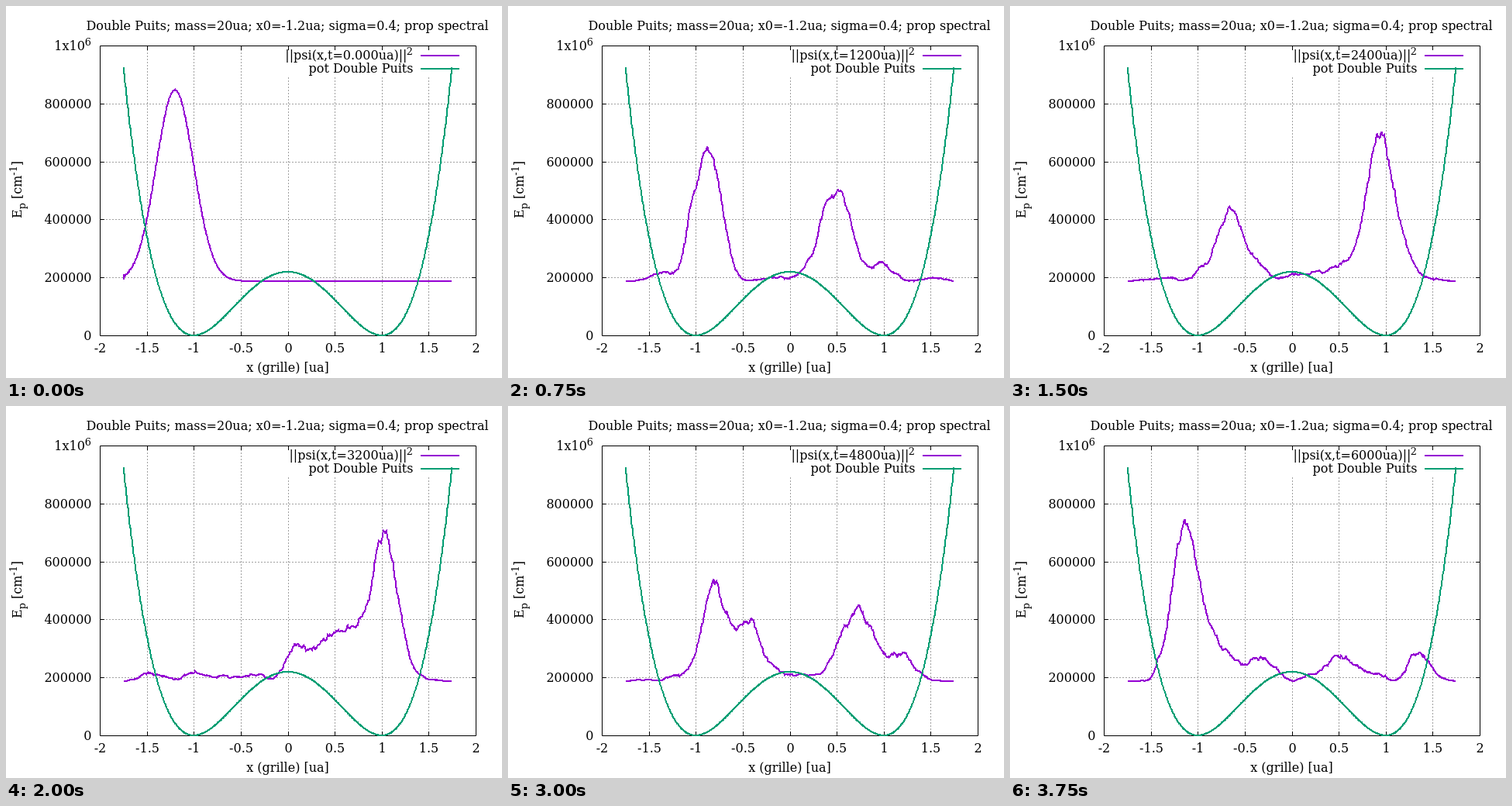
An HTML page that plays this animation: 640x480 px, repeating every 4000 ms.

```html
<!DOCTYPE html>
<html>
<head>
<meta charset="utf-8">
<style>
html, body { margin: 0; width: 100%; height: 100%; overflow: hidden; background: #fff; }
svg { display: block; width: 640px; height: 480px; font: 16px "DejaVu Serif", serif; }
.small { font-size: 12.8px; }
.grid { stroke: #a0a0a0; stroke-dasharray: 2 2; }
.curve { fill: none; stroke-width: 2; shape-rendering: crispEdges; }
.axis { fill: none; stroke: #000; }
</style>
</head>
<body>
<svg id="stage" viewBox="0 0 640 480"></svg>
<script>
// Plot coordinates, in whole pixels
const px = x => Math.round(363.5 + 121.25 * x);
const py = value => Math.round(425 - 374 * value / 1e6);
const PURPLE = '#9400d3', GREEN = '#009e73';

// Wave packet in the double well (x² - 1)², inside a box with hard walls
const HALF = 1.75, LENGTH = 2 * HALF, MASS = 20, START = -1.2, SIGMA = 0.4;
const POINTS = 700, MODES = 350, STEP = LENGTH / POINTS;
const WELL_SCALE = 219474.6, WAVE_BASE = 187200, WAVE_SCALE = 658600;
const xs = Array.from({ length: POINTS }, (_, i) => -HALF + (i + 0.5) * STEP);
const well = x => (x * x - 1) ** 2;
const packet = x => Math.exp(-(((x - START) / SIGMA) ** 2));
const mode = (j, i) => Math.sin(j * Math.PI * (i + 0.5) / POINTS);

// Jacobi diagonalisation: h becomes diagonal, rows of the result are eigenvectors
function diagonalise(h) {
  const n = h.length;
  const vectors = h.map((_, i) => Float64Array.from({ length: n }, (_, j) => +(i === j)));
  for (let sweep = 0, rotated = true; rotated && sweep < 15; sweep++) {
    rotated = false;
    for (let p = 0; p < n; p++) for (let q = p + 1; q < n; q++) {
      const off = h[p][q];
      if (Math.abs(off) < 1e-9) continue;
      rotated = true;
      const theta = (h[q][q] - h[p][p]) / (2 * off);
      const t = (theta < 0 ? -1 : 1) / (Math.abs(theta) + Math.hypot(theta, 1));
      const c = 1 / Math.hypot(t, 1), s = t * c;
      const hp = h[p], hq = h[q], vp = vectors[p], vq = vectors[q];
      const pp = hp[p] - t * off, qq = hq[q] + t * off;
      for (let k = 0; k < n; k++) {
        const a = hp[k], b = hq[k], u = vp[k], w = vq[k];
        hp[k] = c * a - s * b;
        hq[k] = s * a + c * b;
        vp[k] = c * u - s * w;
        vq[k] = s * u + c * w;
      }
      for (let k = 0; k < n; k++) { h[k][p] = hp[k]; h[k][q] = hq[k]; }
      hp[p] = pp; hq[q] = qq; hp[q] = hq[p] = 0;
    }
  }
  return vectors;
}

const cosines = Array.from({ length: 2 * MODES + 1 }, (_, n) =>
  xs.reduce((sum, x, i) => sum + well(x) * Math.cos(n * Math.PI * (i + 0.5) / POINTS), 0) / POINTS);

// Even and odd states do not mix, so each parity is solved alone
const parities = [1, 2].map(first => {
  const js = Array.from({ length: MODES / 2 }, (_, i) => first + 2 * i);
  const shapes = js.map(j => Float64Array.from(xs, (_, i) => mode(j, i)));
  const start = shapes.map(shape =>
    shape.reduce((sum, s, i) => sum + s * packet(xs[i]), 0) * 2 / POINTS);
  const h = js.map(j => Float64Array.from(js, k => cosines[Math.abs(j - k)] - cosines[j + k]
    + (j === k ? (j * Math.PI / LENGTH) ** 2 / (2 * MASS) : 0)));
  const vectors = diagonalise(h);
  const weights = vectors.map(v => v.reduce((sum, a, k) => sum + a * start[k], 0));
  return { shapes, vectors, weights, energies: h.map((row, i) => row[i]) };
});

function density(time) {
  const re = new Float64Array(POINTS), im = new Float64Array(POINTS);
  for (const { shapes, vectors, weights, energies } of parities) {
    const a = new Float64Array(shapes.length), b = new Float64Array(shapes.length);
    vectors.forEach((v, n) => {
      const c = weights[n] * Math.cos(energies[n] * time);
      const s = weights[n] * Math.sin(energies[n] * time);
      for (let k = 0; k < v.length; k++) { a[k] += c * v[k]; b[k] += s * v[k]; }
    });
    shapes.forEach((shape, k) => {
      for (let i = 0; i < POINTS; i++) { re[i] += a[k] * shape[i]; im[i] += b[k] * shape[i]; }
    });
  }
  return re.map((r, i) => r * r + im[i] * im[i]);
}

const trace = values => 'M' + Array.from(values, (v, i) => px(xs[i]) + ' ' + py(v)).join('L');

// Static parts
const text = (x, y, content, anchor = 'middle', extra = '') =>
  `<text x="${x}" y="${y}" text-anchor="${anchor}" ${extra}>${content}</text>`;
const line = (d, kind) => `<path class="${kind}" d="${d}"/>`;
let grid = '', axes = line('M121.5 51.5H606.5V425.5H121.5Z', 'axis'), labels = '';
for (let i = 0; i <= 8; i++) {
  const x = px(i / 2 - 2) + 0.5;
  if (i % 8) grid += line(`M${x} 426V${i > 3 ? 90 : 52}`, 'grid');
  axes += line(`M${x} 425v-5M${x} 52v5`, 'axis');
  labels += text(x, 447, i / 2 - 2);
}
for (let i = 0; i <= 5; i++) {
  const y = py(i * 2e5) + 0.5;
  if (i % 5) grid += line(`M121 ${y}H606`, 'grid');
  axes += line(`M122 ${y}h5M606 ${y}h-5`, 'axis');
  if (i < 5) labels += text(110.5, y + 5, i * 2e5, 'end');
}
labels += text(110, 57, '1x10<tspan class="small" dy="-6">6</tspan>', 'end')
  + text(363, 31, 'Double Puits; mass=20ua; x0=-1.2ua; sigma=0.4; prop spectral')
  + text(363.5, 472, 'x (grille) [ua]')
  + text(0, 0, 'E<tspan class="small" dy="5">p</tspan><tspan dy="-5"> [cm</tspan>'
    + '<tspan class="small" dy="-6">-1</tspan><tspan dy="6">]</tspan>', 'middle',
    'transform="translate(20 237) rotate(-90)"')
  + text(525, 63, '2', 'end', 'class="small"')
  + text(525.5, 86, 'pot Double Puits', 'end');

document.getElementById('stage').innerHTML = grid + axes + labels
  + text(517.5, 69, '', 'end', 'id="clock"')
  + `<path id="wave" class="curve" stroke="${PURPLE}"/>`
  + `<path class="curve" stroke="${PURPLE}" d="M535 64H585"/>`
  + `<path class="curve" stroke="${GREEN}" d="M535 81H585"/>`
  + `<path class="curve" stroke="${GREEN}" d="${trace(xs.map(x => WELL_SCALE * well(x)))}"/>`;

const clock = document.getElementById('clock'), wave = document.getElementById('wave');
const scenes = Array.from({ length: 16 }, (_, i) => ({
  label: `||psi(x,t=${i ? i * 400 : '0.000'}ua)||`,
  path: trace(density(i * 400).map(d => WAVE_BASE + WAVE_SCALE * d))
}));

let shown = -1;
function draw() {
  const index = Math.floor(performance.now() % 4000 / 250);
  if (index !== shown) {
    shown = index;
    clock.textContent = scenes[index].label;
    wave.setAttribute('d', scenes[index].path);
  }
  requestAnimationFrame(draw);
}
draw();
</script>
</body>
</html>
```
